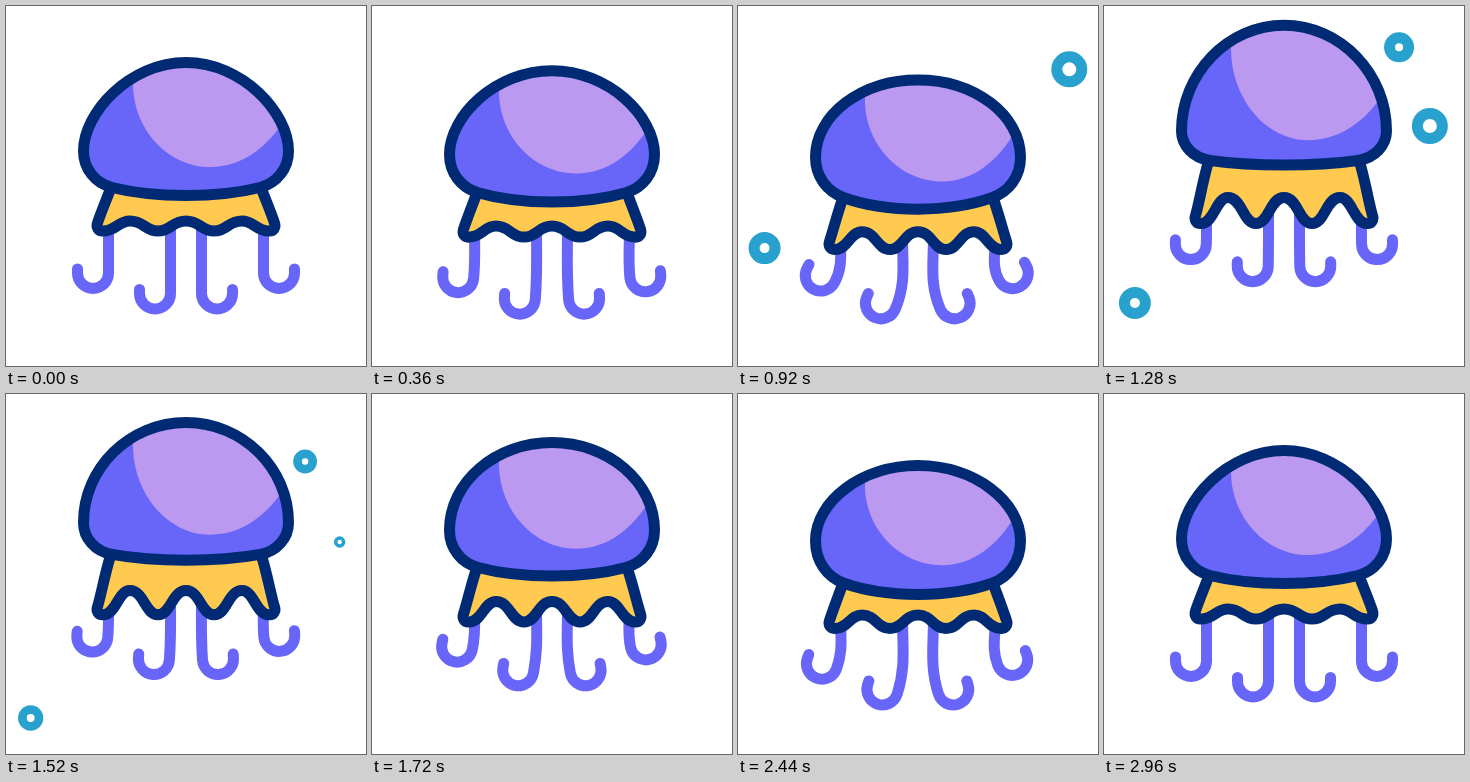
An HTML page with a canvas that plays this animation: 360x360 px, repeating every 3000 ms.

```html
<!DOCTYPE html>
<html lang="en">
<head>
<meta charset="utf-8">
<title>Jellyfish</title>
<style>
  html, body { margin: 0; width: 100%; height: 100%; overflow: hidden; background: #fff; }
  canvas { display: block; width: 360px; height: 360px; }
</style>
</head>
<body>
<canvas id="stage" width="360" height="360"></canvas>
<script>
const ctx = document.getElementById('stage').getContext('2d');
const LOOP = 3000, LINE = 11;
const NAVY = '#002a73', PURPLE = '#6865f9', LAVENDER = '#bb99f1', YELLOW = '#ffca4f', TEAL = '#28a1cf';

// Poses in order: rest, squash, stretch, overshoot, back to rest.
const BODY = [200, 720, 1300, 2140, 2960];
const INNER = [200, 720, 1300, 2220, 2960];
const OUTER = [200, 690, 1300, 2200, 2960];
const SWAY = [200, 800, 1300, 2200, 2960];

const easeSine = p => 0.5 - 0.5 * Math.cos(Math.PI * p);

function track(t, times, poses) {
  if (t <= times[0] || t >= times[4]) return poses[0];
  const i = times.findIndex(k => k > t) - 1;
  const p = easeSine((t - times[i]) / (times[i + 1] - times[i]));
  return poses[i] + (poses[(i + 1) % 4] - poses[i]) * p;
}

// Closed Bezier outline from its left half, mirrored at x = 180.
function mirrored(half) {
  const right = half.slice(0, -1).reverse().map(([x, y]) => [360 - x, y]);
  const [start, ...rest] = [...half, ...right];
  return new Path2D(`M${start} C${rest.join(' ')} Z`);
}

function outline(path) {
  ctx.lineWidth = LINE;
  ctx.strokeStyle = NAVY;
  ctx.stroke(path);
}

function tentacle(x, side, rootY, bottomY, degrees, shift) {
  const r = 15.5, a = degrees * Math.PI / 180;
  const sin = Math.sin(a), cos = Math.cos(a);
  const cx = r + shift, cy = bottomY - r;
  const sx = cx - r * cos, sy = cy + r * sin;
  const handle = 0.38 * (sy - rootY);
  ctx.save();
  ctx.translate(x, 0);
  ctx.scale(side, 1);
  ctx.beginPath();
  ctx.moveTo(0, rootY);
  ctx.bezierCurveTo(0, rootY + handle, sx - handle * sin, sy - handle * cos, sx, sy);
  ctx.arc(cx, cy, r, Math.PI - a, -a, true);
  ctx.lineTo(cx + r * cos - 4 * sin, cy - r * sin - 4 * cos);
  ctx.lineWidth = LINE;
  ctx.strokeStyle = PURPLE;
  ctx.stroke();
  ctx.restore();
}

function drawTentacles(t, rootY) {
  const innerY = track(t, INNER, [303, 326.5, 275.5, 313]);
  const leftY = track(t, OUTER, [282.5, 299.5, 253.5, 286]);
  const rightY = track(t, OUTER, [282.5, 296, 253.5, 281]);
  const inner = track(t, SWAY, [0, 27, 1, 23]);
  const outer = track(t, SWAY, [0, 33, 1, 27]);
  tentacle(102.5, -1, rootY, leftY, outer, outer * 0.15);
  tentacle(164.5, -1, rootY, innerY, inner, inner * 0.26);
  tentacle(195.5, 1, rootY, innerY, inner, inner * 0.24);
  tentacle(257.5, 1, rootY, rightY, outer, outer * 0.06);
}

function drawSkirt(top, low, wave) {
  const high = low - wave;
  const skirt = mirrored([
    [180, top], [150, top], [130, top], [105, top],
    [100.5, top + 12], [94.5, low - 17], [91.5, low - 8],
    [90, low - 3.5], [92.5, low + 0.3], [97, low],
    [110, low], [112, high], [124, high],
    [138, high], [139, low], [152, low],
    [165, low], [166, high], [180, high]
  ]);
  ctx.fillStyle = YELLOW;
  ctx.fill(skirt);
  outline(skirt);
}

function drawBell(top, wide, bottom, sag, shine, bulge) {
  const edge = bottom - sag;
  const bell = mirrored([
    [180, top], [123.4, top], [77.5, wide - bulge * (wide - top)], [77.5, wide],
    [77.5, wide + 0.48 * (edge - wide)], [89, edge - 0.53 * sag], [106, edge],
    [130, edge + 0.75 * sag], [152, bottom], [180, bottom]
  ]);
  const left = top + 0.2 * (shine - top);
  const right = wide - 0.31 * (wide - top);
  ctx.fillStyle = PURPLE;
  ctx.fill(bell);
  ctx.save();
  ctx.clip(bell);
  ctx.fillStyle = LAVENDER;
  ctx.fill(new Path2D(`M127 ${top - 10} V${left}
    C127 ${left + 0.55 * (shine - left)} 162 ${shine} 204 ${shine}
    C236 ${shine} 260 ${shine - 0.45 * (shine - right)} 276 ${right} V${top - 10} Z`));
  ctx.restore();
  outline(bell);
}

function bubble(t, b) {
  if (t <= b.start || t >= b.end) return;
  const p = (t - b.start) / (b.end - b.start);
  const size = Math.min(1, (t - b.start) / 120, (b.end - t) / b.fade);
  ctx.beginPath();
  ctx.arc(b.x + b.drift * Math.cos(2 * Math.PI * p), b.y + b.fall * easeSine(p), b.r * size, 0, 2 * Math.PI);
  ctx.lineWidth = LINE * size;
  ctx.strokeStyle = TEAL;
  ctx.stroke();
}

const bubbles = [
  { x: 329.5, drift: 5, y: 55, fall: 95, r: 12.5, start: 760, end: 1600, fade: 250 },
  { x: 298, drift: 4, y: 27, fall: 45, r: 9.5, start: 1060, end: 1640, fade: 150 },
  { x: 28, drift: -4, y: 234, fall: 92, r: 10.5, start: 760, end: 1600, fade: 100 }
];

function draw(now) {
  const t = now % LOOP;
  const body = (...poses) => track(t, BODY, poses);
  const top = body(56.5, 94, 19, 78);
  const wide = body(145, 161, 125, 147.5);
  const bottom = body(189.5, 219.4, 158.8, 205);
  const sag = body(8, 14, 4.5, 12.5);
  const shine = body(161, 190.7, 134, 175.5);
  const bulge = body(0.43, 0.55, 0.54, 0.56);
  const low = body(225, 253, 217.4, 238.5);
  const wave = body(10, 14.6, 26, 15);

  ctx.clearRect(0, 0, 360, 360);
  ctx.lineCap = ctx.lineJoin = 'round';
  bubbles.forEach(b => bubble(t, b));
  drawTentacles(t, low - wave / 2 - 4);
  drawSkirt(bottom - sag, low, wave);
  drawBell(top, wide, bottom, sag, shine, bulge);
}

function loop() {
  draw(performance.now());
  requestAnimationFrame(loop);
}
loop();
</script>
</body>
</html>
```
